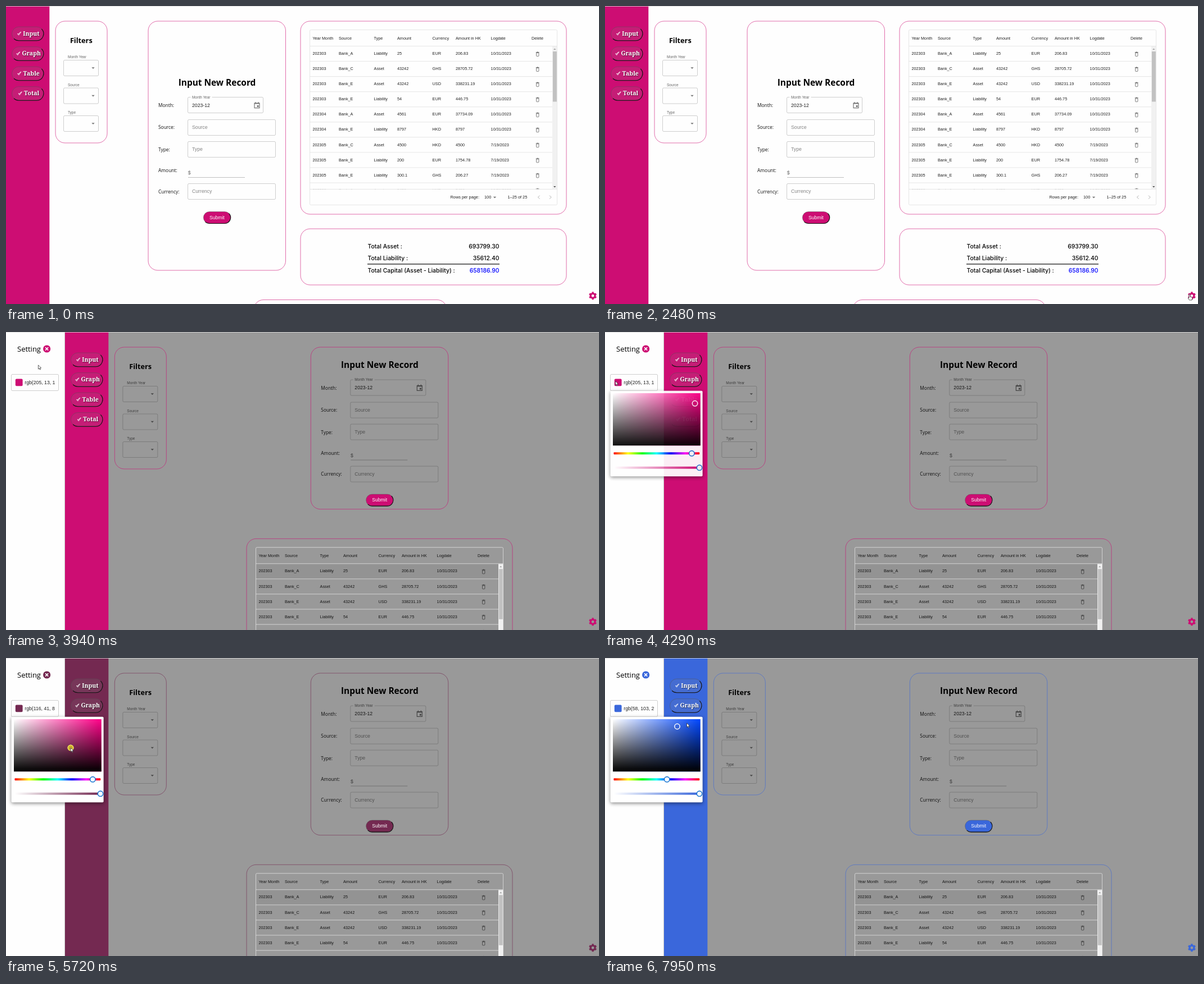
Write an HTML page that moves like this. It is 1055x531 px and loops after 8000 ms.

```html
<!DOCTYPE html>
<html lang="en">
<head>
<meta charset="utf-8">
<title>Theme colour setting</title>
<style>
  html, body { margin: 0; width: 100%; height: 100%; overflow: hidden; }
  svg { display: block; width: 1055px; height: 531px; }
  text { white-space: pre; }
  .card, .field { fill: none; transform: translate(.5px, .5px); }
  .card { stroke: var(--c); stroke-opacity: .6; }
  .field { stroke: #00000030; }
  .line { fill: none; stroke: #e0e0e0; stroke-width: .8; }
  .theme { fill: var(--c); }
  .icon { fill: none; stroke: #0000008a; }
  .slab { text-shadow: 1px 1px 1px #0008; }
  .thumb { fill: #fff; stroke: #1976d2; stroke-width: 1.6; }
  .paper { fill: #fff; filter: drop-shadow(0 2px 3px #0007); }
</style>
</head>
<body>
<svg id="stage" viewBox="0 0 1055 531"></svg>
<script>
const ARIAL = "'Liberation Sans', Arial, sans-serif";
const OPEN = "'Open Sans', sans-serif";
const SLAB = "'Noto Serif', serif";
const INTER = "Inter, sans-serif";
const INK = '#000000de', MUTED = '#00000099';

const text = (x, y, str, size, { font = ARIAL, fill = INK, weight = 400, anchor = 'start', cls = '' } = {}) =>
  `<text x="${x}" y="${y}" font-size="${size}" font-family="${font}" fill="${fill}" font-weight="${weight}" text-anchor="${anchor}" class="${cls}">${str}</text>`;
const rect = (cls, x, y, w, h, r = 0, extra = '') =>
  `<rect class="${cls}" x="${x}" y="${y}" width="${w}" height="${h}" rx="${r}" ${extra}/>`;
const path = (d, attrs) => `<path d="${d}" ${attrs}/>`;
const caret = (x, y) => path(`M${x - 2.7} ${y - 1.3}h5.4l-2.7 2.7z`, 'fill="#0000008a"');

// Pill with a dark lower right edge
const pill = (x, y, w, h, fill) => {
  const r = h / 2;
  return rect('', x, y, w, h, r, `style="fill:${fill}" stroke="#5558" stroke-width=".9"`) +
    path(`M${x + r * .3} ${y + h * .86}q${r * .3} ${h * .14} ${r * .7} ${h * .14}h${w - h}a${r} ${r} 0 0 0 ${r * .7} ${-h * .85}`,
      'fill="none" stroke="#111" stroke-width="1.1"');
};

function sidebar() {
  const items = [['Input', 30.3, 49], ['Graph', 28.5, 84.5], ['Table', 30.5, 120], ['Total', 32, 155.5]];
  return rect('theme', 0, 0, 77.3, 531) + items.map(([name, x, y]) =>
    pill(10.5, y - 11.8, 56.5, 24.5, 'rgba(140,140,140,.13)') +
    path(`M${x - 9.8} ${y + .3}l2 2.8l4.2-5.8l-2.4 1.200l-1.600 2.400z`, 'fill="none" stroke="#fff" stroke-width=".9"') +
    text(x, y + 3.8, name, 10.5, { font: SLAB, fill: '#fff', weight: 600, cls: 'slab' })).join('');
}

function filters() {
  return rect('card', 87.5, 26.5, 92, 217, 17) +
    text(133.8, 66.3, 'Filters', 12.7, { font: OPEN, fill: '#000', weight: 700, anchor: 'middle' }) +
    ['Month Year', 'Source', 'Type'].map((label, i) => {
      const y = 96 + 49.5 * i;
      return rect('field', 102, y, 62, 28, 2) + caret(155, y + 14.6) +
        text(110, y - 2.8, label, 6.5, { fill: MUTED });
    }).join('');
}

function form() {
  const fields = [['Source', 202], ['Type', 241], ['Currency', 316]];
  const labels = [['Month', 180], ['Source', 219.3], ['Type', 259], ['Amount', 296.3], ['Currency', 333.8]];
  return text(375.5, 141.5, 'Input New Record', 15.45, { font: OPEN, fill: '#000', weight: 700, anchor: 'middle' }) +
    labels.map(([s, y]) => text(271, y, s + ':', 8.4, { font: OPEN, fill: '#111' })).join('') +
    path('M328 162H325q-2 0-2 2v24q0 2 2 2h130q2 0 2-2v-24q0-2-2-2H366', 'class="field"') +
    text(331, 164.6, 'Month Year', 6.4, { fill: MUTED }) +
    text(331, 179.5, '2023-12', 8.7) +
    path('M442 173h9v8.700h-9zM442 174h9M444 171v2M449 171v2', 'class="icon" stroke-width="1.2"') +
    rect('', 446.6, 177, 3, 3, 0, 'fill="#0000008a"') +
    fields.map(([s, y]) => rect('field', 323, y, 156, 28, 2) +
      text(331, y + 17.4, s, 8.7, { fill: '#0000007a' })).join('') +
    text(323.8, 300.3, '$', 8.7, { fill: MUTED }) +
    path('M324 305.500h101', 'stroke="#00000040"') +
    pill(351.3, 366.5, 48.4, 21, 'var(--c)') +
    text(375.4, 379.8, 'Submit', 8.6, { fill: '#fff', anchor: 'middle' });
}

function table() {
  const columns = [545.4, 592, 654.6, 696, 758.6, 800, 862.6, 935];
  const cells = (list, y) => list.map((s, i) => text(columns[i], y, s, 7.25)).join('');
  const rows = [
    '202303 A Liability 25 EUR 206.83', '202303 C Asset 43242 GHS 28705.72',
    '202303 E Asset 43242 USD 338231.19', '202303 E Liability 54 EUR 446.75',
    '202304 A Asset 4561 EUR 37734.09', '202304 E Liability 8797 HKD 8797',
    '202305 C Asset 4500 HKD 4500', '202305 E Liability 200 EUR 1754.78',
    '202305 E Liability 300.1 GHS 206.27', '202306 A Asset 5450 HKD 5450'];
  const body = rows.map((row, i) => {
    const [month, bank, ...rest] = row.split(' ');
    const y = 71.6 + 27.05 * i;
    return cells([month, 'Bank_' + bank, ...rest, i > 5 && i < 9 ? '7/19/2023' : '10/31/2023'], y + 15.6) +
      path(`M943.500 ${y + 11.9}h4.400v5q0 1-1 1h-2.400q-1 0-1-1zM942.700 ${y + 10.9}h6M944.700 ${y + 10.3}h2`, 'class="icon" stroke-width=".9"') +
      path(`M540.5 ${y + 27}H972`, 'class="line"');
  }).join('');
  return rect('card', 523.5, 26.5, 473, 344, 17) +
    cells(['Year Month', 'Source', 'Type', 'Amount', 'Currency', 'Amount in HK', 'Logdate', 'Delete'], 60.2) +
    rect('', 540.5, 72, 431.5, 27, 0, 'id="hover" fill="#0000000a"') +
    `<g clip-path="url(#body)">${body}</g>` +
    rect('line', 540.5, 42.5, 440, 312, 2) +
    path('M540.5 71.500h440M540.5 326.500h440', 'class="line"') +
    rect('', 972, 72, 8.3, 254.5, 0, 'fill="#f1f1f1"') +
    rect('', 972.8, 81, 7, 89.5, 0, 'fill="#c1c1c1"') +
    path('M974 78h4.400l-2.200-2.600z', 'fill="#a3a3a3"') + path('M974 321h4.400l-2.200 2.600z', 'fill="#505050"') +
    text(790.5, 343, 'Rows per page:', 7.35) + text(851, 343, '100', 7.4) + caret(869.5, 341) +
    text(892.5, 343, '1–25 of 25', 7.35) +
    path('M949.500 337.700l-3 3l3 3M967 337.700l3 3l-3 3', 'fill="none" stroke="#00000050"');
}

function totals() {
  const rows = [['Total Asset :', '693799.30', 432], ['Total Liability :', '35612.40', 453], ['Total Capital (Asset - Liability) :', '658186.90', 474.5]];
  return rect('card', 523.5, 396.5, 473, 100, 17) + rect('card', 440.5, 523, 343, 100, 17) +
    rows.map(([s, n, y], i) => text(643.5, y, s, 10.42, { font: INTER, fill: '#000', weight: 500 }) +
      text(877.5, y, n, 10.4, { font: INTER, fill: i < 2 ? '#000' : '#00f', weight: 500, anchor: 'end' })).join('') +
    path('M643 459.900h235', 'stroke="#111" stroke-width="1.100"');
}

function drawer() {
  return rect('', 0, 0, 104.5, 531, 0, 'fill="#fefefe"') +
    text(20, 35, 'Setting', 13, { font: OPEN, fill: '#000' }) +
    '<circle class="theme" cx="72.6" cy="30" r="6.6"/>' +
    path('M70 27.400l5.200 5.200m0-5.200l-5.200 5.200', 'stroke="#fff" stroke-width="1.500"') +
    rect('field', 9, 75, 84, 29, 2) +
    rect('theme', 16.8, 83.4, 12.8, 12.8, 2) +
    '<g clip-path="url(#value)">' + text(33.3, 92.9, '', 8.7, { cls: 'value' }) + '</g>';
}

function picker() {
  return rect('paper', 9.6, 104.7, 164, 152.5, 2) +
    rect('', 14, 109, 155.7, 93.3, 0, 'fill="url(#sat)"') + rect('', 14, 109, 155.7, 93.3, 0, 'fill="url(#val)"') +
    rect('', 15.5, 214.3, 152.7, 4, 1, 'fill="url(#hues)"') +
    rect('', 15.5, 239.8, 152.7, 4, 1, 'fill="url(#alpha)"') +
    '<circle class="thumb" id="hueThumb" r="4.7" cy="216.3"/><circle class="thumb" cx="168" cy="241.8" r="4.7"/>' +
    '<circle id="marker" r="4.7" fill="none" stroke="#fff" stroke-width="1.5"/>';
}

const gradient = (id, stops, down) => `<linearGradient id="${id}" x2="${down ? 0 : 1}" y2="${down ? 1 : 0}">` +
  stops.map(([color, alpha = 1], i) => `<stop offset="${i / (stops.length - 1)}" style="stop-color:${color};stop-opacity:${alpha}"/>`).join('') + '</linearGradient>';
const clip = (id, ...box) => `<clipPath id="${id}">${rect('', ...box)}</clipPath>`;
const group = (id, inner) => `<g id="${id}">${inner}</g>`;

const stage = document.getElementById('stage');
stage.innerHTML = '<defs>' +
  gradient('sat', [['#fff'], ['var(--h)']]) + gradient('val', [['#000', 0], ['#000']], true) +
  gradient('hues', ['#f00', '#ff0', '#0f0', '#0ff', '#00f', '#f0f', '#f00'].map(c => [c])) +
  gradient('alpha', [['var(--c)', 0], ['var(--c)']]) +
  clip('body', 540, 72, 432, 254.8) + clip('value', 33, 78, 54, 24) + '</defs>' +
  rect('', 0, 0, 1055, 531, 0, 'id="page"') +
  group('side', sidebar()) + group('filters', filters()) +
  group('form', rect('card', 252.5, 26.5, 244.5, 444, 17, 'id="formCard"') + group('formBody', form())) +
  group('table', table()) + group('totals', totals()) + group('drawer', drawer()) + group('picker', picker()) +
  `<g fill="none" style="stroke:var(--c)" transform="translate(1044 516.3)"><circle r="4" stroke-width="3.2"/>
   <circle r="5.8" stroke-width="2.4" pathLength="6" stroke-dasharray=".52 .48" stroke-dashoffset="-.24"/></g>` +
  rect('', 0, 0, 1055, .8, 0, 'fill="#ddd"') +
  '<circle id="click" r="5.6" fill="#e8d820"/>' +
  '<g id="cursor" fill="#fff" stroke="#222" stroke-width=".7">' +
  path('M0 0v7.200l1.700-1.500l1.200 2.600l1.200-.6l-1.200-2.500h2.300z', 'id="arrow"') +
  path('M-1 .5a1 1 0 0 1 2 0v3.500l3 .8q1 .4 .8 1.600l-.6 3.600h-4.600l-2.400-3.600q.2-1 1.800 0z', 'id="hand"') + '</g>';

const $ = id => document.getElementById(id);
const valueText = stage.querySelector('.value');
const show = (id, on) => $(id).style.display = on ? '' : 'none';
const move = (id, x, y) => $(id).setAttribute('transform', `translate(${x} ${y})`);
const smooth = u => u * u * (3 - 2 * u);

// Eased interpolation of [time, x, y] keys
function along(keys, t) {
  const next = keys.findIndex(k => k[0] > t);
  if (next < 1) return keys[next < 0 ? keys.length - 1 : 0].slice(1);
  const [a, b] = [keys[next - 1], keys[next]];
  const u = smooth((t - a[0]) / (b[0] - a[0]));
  return [a[1] + (b[1] - a[1]) * u, a[2] + (b[2] - a[2]) * u];
}

function hsv(h, s, v) {
  return [5, 3, 1].map(n => {
    const k = (n + h / 60) % 6;
    return Math.round(255 * v * (1 - s * Math.max(0, Math.min(k, 4 - k, 1))));
  });
}

const cursorKeys = [
  [1300, 1019, 377], [2080, 1040, 514], [3219, 1040, 514], [3220, 771, 420], [3360, 771, 420],
  [3900, 60, 57], [4170, 18.5, 87.5], [4350, 18.5, 87.5], [4800, 125, 122], [5390, 125, 122],
  [5700, 115, 160], [5990, 115, 160], [6290, 111.5, 217], [6900, 111.5, 217], [7240, 115, 160],
  [7650, 128.5, 122], [7710, 128.5, 122], [7950, 145.5, 116]];
const markerKeys = [
  [0, 160, 127.3], [4850, 160, 127.3], [4851, 125, 122], [5390, 125, 122], [5700, 115, 160],
  [7240, 115, 160], [7650, 128.5, 122]];
const presses = [[2360, 2360], [4850, 4940], [5390, 5800], [6450, 6450], [7240, 7660]];

function draw(t) {
  const open = t >= 2600;
  const hue = t < 6450 ? 328 : 223.2;
  const [mx, my] = along(markerKeys, t);
  const color = hsv(hue, (mx - 14) / 156, 1 - (my - 109) / 93.3);
  stage.style.setProperty('--c', `rgb(${color})`);
  stage.style.setProperty('--h', `rgb(${hsv(hue, 1, 1)})`);
  valueText.textContent = `rgb(${color.join(', ')})`;

  $('page').setAttribute('fill', open ? '#999' : '#fefefe');
  move('side', open ? 105 : 0, 0);
  move('filters', open ? 105.3 : 0, 0);
  move('form', open ? 289.3 : 0, 0);
  move('formBody', 0, open ? -77.4 : 0);
  $('formCard').setAttribute('height', open ? 288.7 : 444);
  move('table', open ? -96 : 0, open ? 341.3 : 0);
  show('totals', !open);
  show('drawer', open);
  show('hover', t >= 3370);

  show('picker', t >= 4230);
  $('picker').style.opacity = Math.min(1, .75 + (t - 4230) / 330);
  move('marker', mx, my);
  const [thumbX] = along([[6450, 154.3, 0], [6590, 110.2, 0]], t);
  $('hueThumb').setAttribute('cx', thumbX);

  const [cx, cy] = along(cursorKeys, t);
  const hand = t > 2000 && t < 3220 || t > 6200 && t < 7000;
  show('cursor', t >= 1300);
  show('hand', hand);
  show('arrow', !hand);
  move('cursor', cx, cy);
  move('click', cx, cy);
  const press = presses.find(([from, to]) => t >= from && t < to + 120);
  $('click').style.opacity = press ? .75 * Math.min(1, 1 - (t - press[1]) / 120) : 0;
}

function tick(now) {
  draw(now % 8000);
  requestAnimationFrame(tick);
}
requestAnimationFrame(tick);
</script>
</body>
</html>
```
